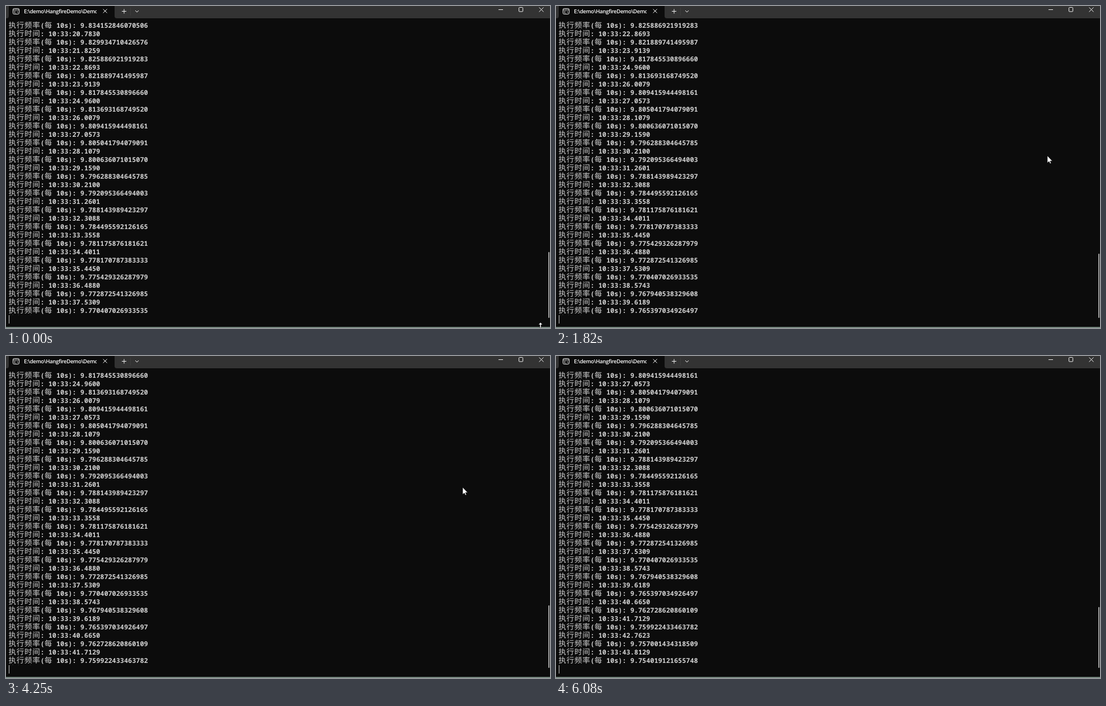
Write an HTML page that moves like this. It is 972 by 576 pixels and loops after 6.34 s.

```html
<!DOCTYPE html>
<html lang="zh-CN">
<head>
<meta charset="utf-8">
<title>Terminal</title>
<style>
html, body { margin: 0; width: 972px; height: 576px; overflow: hidden; background: #0c0c0c; }
#stage { position: relative; width: 972px; height: 576px; overflow: hidden; background: #0c0c0c; }
#stage > * { position: absolute; }
#chrome { left: 0; top: 0; }
#title {
  left: 32px; top: 3px; width: 130px; height: 14px; overflow: hidden; white-space: pre;
  font: 600 9.6px/14px "Open Sans", "Noto Sans", sans-serif;
  letter-spacing: -.35px; color: #fff; text-rendering: geometricPrecision;
}
#view { left: 4.5px; top: 28px; width: 600px; overflow: hidden; }
#log {
  font: 600 11.875px/15px "Noto Sans Mono", "DejaVu Sans Mono", monospace;
  color: #d2d2d2; white-space: pre; text-rendering: geometricPrecision;
}
#log div { height: 15px; }
#log b {
  font: 400 13.5px/0 "Noto Sans CJK SC", "Noto Sans CJK JP", sans-serif;
  letter-spacing: .75px;
}
#caret { left: 5px; top: 553px; width: 1px; height: 15px; background: #ccc; }
#thumb { left: 969px; bottom: 18px; width: 2px; border-radius: 1px; background: #a6a6a6; }
#edge { left: 0; top: 573.5px; width: 972px; height: 3px; background: #76877e; }
#pointer { left: 0; top: 0; }
#resize { left: 950px; top: 565px; }
</style>
</head>
<body>
<div id="stage">
  <svg id="chrome" width="972" height="22" fill="none" stroke="#f2f2f2">
    <rect width="972" height="22" fill="#333" stroke="none"/>
    <path d="M1 22q4 0 4-4V0H194V18q0 4 4 4z" fill="#0c0c0c" stroke="none"/>
    <rect x="12.5" y="4.5" width="11" height="10" rx="2"/>
    <path d="M12.5 7H23.5"/>
    <path d="M17 9.5h-2v3h2M18.3 9.8v.4M18.3 12v.4M20 9.3l1.6 3.4" stroke-width=".8"/>
    <path d="M173.5 5.5l7 7m0-7l-7 7M207 9.5h8M211 5.5v8M231 8l3 3 3-3"/>
    <path d="M222.5 3v14" stroke="#3d3d3d"/>
    <path d="M880 6.5h8M952.5 2.5l8 8m0-8l-8 8"/>
    <rect x="916.5" y="2.5" width="7" height="7.5" rx="1"/>
  </svg>
  <div id="title">E:\demo\HangfireDemo\Demo</div>
  <div id="view"><div id="log"></div></div>
  <div id="caret"></div>
  <div id="thumb"></div>
  <div id="edge"></div>
  <svg id="resize" width="10" height="11">
    <path d="M5 1L8.5 5H6V11H4V5H1.5z" fill="#fff" stroke="#000" stroke-width=".5"/>
  </svg>
  <svg id="pointer" width="10" height="16">
    <path d="M0 0V12.5L3 10 4.8 14 6.6 13.2 4.9 9.3H8.8z" fill="#fff" stroke="#000" stroke-width=".5"/>
  </svg>
</div>
<script>
const LOOP = 6340, ROW = 15, ROWS = 35;
const FIRST_PRINT = 760, PRINT_GAP = 1050, LAST_PRINT = 6, LAST_SCROLL = 6080;
const START = -40.255, RUNS = 59, ENTRIES = 24;
const [view, log, thumb, resize, pointer] =
  ['view', 'log', 'thumb', 'resize', 'pointer'].map(id => document.getElementById(id));

// Each job runs a little over a second after the last, with a slow sway
const stamp = i => 20.782 + 1.047 * i + .01 * Math.cos((i - 11.5) * Math.PI / 7.5);
const rate = i => 10 * (RUNS + i) / (stamp(i - 1) - START);
const row = html => `<div>${html}</div>`;

let html = '';
for (let i = 0; i < ENTRIES; i++) {
  if (i) html += row(`<b>执行时间</b>: 10:33:${stamp(i - 1).toFixed(4)}`);
  html += row(`<b>执行频率</b>(<b>每</b> 10s): ${rate(i).toFixed(15)}`);
}
log.innerHTML = html;

// Pointer strokes: start and end in ms, then where the tip comes to rest
const strokes = [
  [70, 690, 883, 277],
  [690, 1160, 878, 268],
  [2740, 2880, 866, 266],
  [3690, 4250, 816, 235],
  [4780, 5130, 955, 592]
];
const smooth = p => p * p * (3 - 2 * p);

function pointerAt(t) {
  let x = 955, y = 566;
  for (const [from, to, endX, endY] of strokes) {
    const steps = Math.round((to - from) / 70);
    const p = Math.min(1, Math.max(0, (t - from) / (to - from)));
    const k = smooth(Math.floor(p * steps + .001) / steps);
    x += (endX - x) * k;
    y += (endY - y) * k;
  }
  return [x, y];
}

function render(t) {
  const prints = Math.max(0, Math.floor((t - FIRST_PRINT) / PRINT_GAP) + 1);
  const pending = prints === LAST_PRINT && t < LAST_SCROLL ? 1 : 0;
  const scrolled = 2 * prints - pending;
  log.style.transform = `translateY(${-ROW * scrolled}px)`;
  view.style.height = ROW * (ROWS + pending) + 'px';
  thumb.style.height = 118 - .75 * scrolled + 'px';

  const [x, y] = pointerAt(t);
  pointer.style.transform = `translate(${x}px, ${y}px)`;
  pointer.style.visibility = t < 70 ? 'hidden' : 'visible';
  resize.style.visibility = t < 70 ? 'visible' : 'hidden';
}

function tick() {
  render(performance.now() % LOOP);
  requestAnimationFrame(tick);
}
tick();
</script>
</body>
</html>
```
